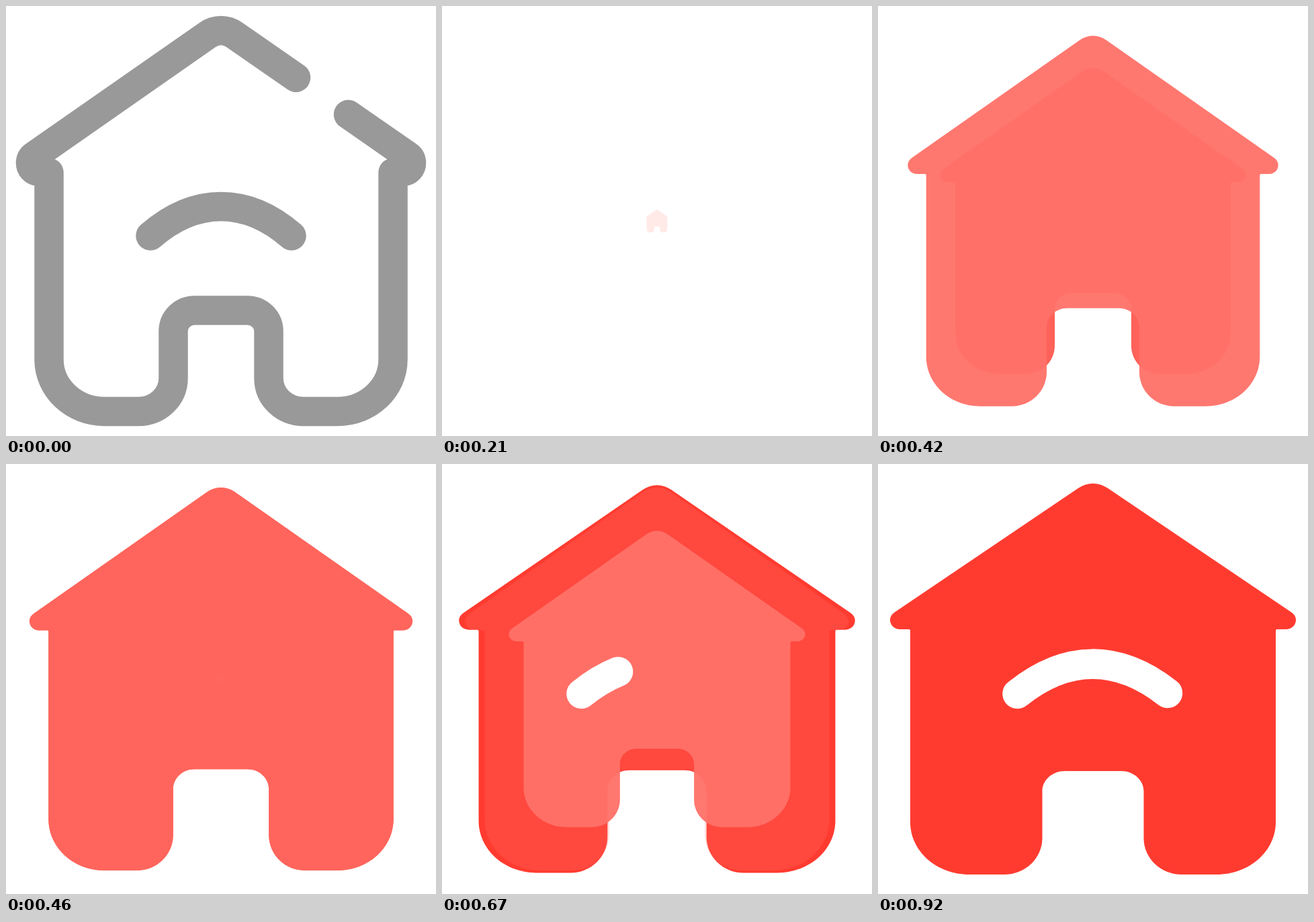
These frames come from a looping animation (640 px wide and 640 px high, 0.96 s). An HTML page with a canvas:

```html
<!DOCTYPE html>
<html lang="en">
<head>
<meta charset="utf-8">
<title>Home icon</title>
<style>
  html, body { margin: 0; width: 100%; height: 100%; overflow: hidden; background: #fff; }
  canvas { display: block; width: 640px; height: 640px; }
</style>
</head>
<body>
<canvas id="stage" width="640" height="640"></canvas>
<script>
const ctx = document.getElementById('stage').getContext('2d');
const LOOP = 960, FPS = 24, CENTER = 320;
const RED = '#ff3b30', LIGHT = '#ff7169', GREY = '#999';
const HALF_W = 302, HALF_H = 291, PULSE = 285, PULSE_ALPHA = 0.95;

const clamp = v => Math.min(1, Math.max(0, v));
const mix = (a, b, t) => a + (b - a) * t;
const progress = (t, start, length) => clamp((t - start) / length);
const smooth = x => x * x * (3 - 2 * x);
const eased = (t, start, length) => smooth(progress(t, start, length));

// Linear interpolation through [time, value] keys.
function keyed(t, keys) {
  if (t <= keys[0][0]) return keys[0][1];
  for (let i = 1; i < keys.length; i++) {
    const [t0, v0] = keys[i - 1], [t1, v1] = keys[i];
    if (t < t1) return mix(v0, v1, (t - t0) / (t1 - t0));
  }
  return keys[keys.length - 1][1];
}

function mirrored(path) {
  const flipped = new Path2D();
  flipped.addPath(path, new DOMMatrix([-1, 0, 0, 1, 2 * CENTER, 0]));
  return flipped;
}

const house = new Path2D(`M298 36 L25 220.5 C20.5 223.5 18 227.5 18 232 C18 240 24.5 246 33 246
  H46 Q48 246 48 248 V533 C48 576 87 611 136 611 H188 C219 611 244.5 587 244.5 557
  V487 C244.5 470.5 259.5 457 278 457 H362 C380.5 457 395.5 470.5 395.5 487
  V557 C395.5 587 421 611 452 611 H504 C553 611 592 576 592 533 V248 Q592 246 594 246
  H607 C615.5 246 622 240 622 232 C622 227.5 619.5 223.5 615 220.5
  L342 36 C335 31.3 327.5 29 320 29 C312.5 29 305 31.3 298 36 Z`);

const eave = 'M49 246.5 C41 246 36.5 240 36.5 234 C36.5 229.5 38.5 225.5 42 223';
const outline = new Path2D(`${eave} L300 43 C306 38.8 313 36.5 320 36.5
  C327 36.5 334 38.8 340 43 L431.5 106.5
  M64 248 V526 C64 569 101 603.5 147 603.5 H197 C226 603.5 249 581.5 249 554
  V484 C249 467 263 453 281 453 H359 C377 453 391 467 391 484
  V554 C391 581.5 414 603.5 443 603.5 H493 C539 603.5 576 569 576 526 V248
  M215 342 C282 284 358 284 425 342`);
outline.addPath(mirrored(new Path2D(`${eave} L130.5 161.5`)));

const arc = new Path2D('M207.5 342 C281 283 357 283 431 341');
const ARC_LENGTH = 246.5;

function drawHouse(halfW, halfH, color, alpha) {
  if (halfW <= 0 || alpha <= 0) return;
  ctx.save();
  ctx.globalAlpha = alpha;
  ctx.fillStyle = color;
  ctx.translate(CENTER, CENTER);
  ctx.scale(halfW / HALF_W, halfH / HALF_H);
  ctx.translate(-CENTER, -CENTER);
  ctx.fill(house);
  ctx.restore();
}

function drawLine(path, color, width, alpha, dash = []) {
  ctx.save();
  ctx.globalAlpha = alpha;
  ctx.strokeStyle = color;
  ctx.lineWidth = width;
  ctx.lineCap = ctx.lineJoin = 'round';
  ctx.setLineDash(dash);
  ctx.stroke(path);
  ctx.restore();
}

function drawPulse(step, start, length, fadeIn, fadeOut) {
  const half = PULSE * eased(step, start, length);
  drawHouse(half, half, LIGHT, eased(step, start, fadeIn) * keyed(step, fadeOut));
}

function draw(step) {
  ctx.fillStyle = '#fff';
  ctx.fillRect(0, 0, 640, 640);

  const outlineAlpha = 1 - progress(step, 0, 3);
  if (outlineAlpha > 0) drawLine(outline, GREY, 43.5, outlineAlpha);

  // The solid house pops in as a square, then widens to its final shape.
  const pop = eased(step, 7.9, 2.95);
  const widen = 1 - Math.pow(1 - progress(step, 11, 11), 1.4);
  drawHouse(mix(PULSE, HALF_W, widen) * pop, mix(PULSE, HALF_H, widen) * pop, RED, pop);

  drawPulse(step, 4, 6.73, 4, [[10, PULSE_ALPHA], [13, 0.46], [16, 0.24], [19, 0]]);
  drawPulse(step, 10.14, 8.47, 2.8, [[17, PULSE_ALPHA], [22, 0]]);

  const trim = eased(step, 14, 6);
  if (trim > 0) {
    drawLine(arc, '#fff', 44.5, 1, trim < 1 ? [ARC_LENGTH * trim, 999] : []);
  }
}

// The motion advances in 24 steps per second; the offset absorbs 10 ms rounding.
function tick(now) {
  const time = now % LOOP;
  draw(Math.min(22, Math.floor(time * FPS / 1000 + 0.13)));
  requestAnimationFrame(tick);
}
draw(0);
requestAnimationFrame(tick);
</script>
</body>
</html>
```
